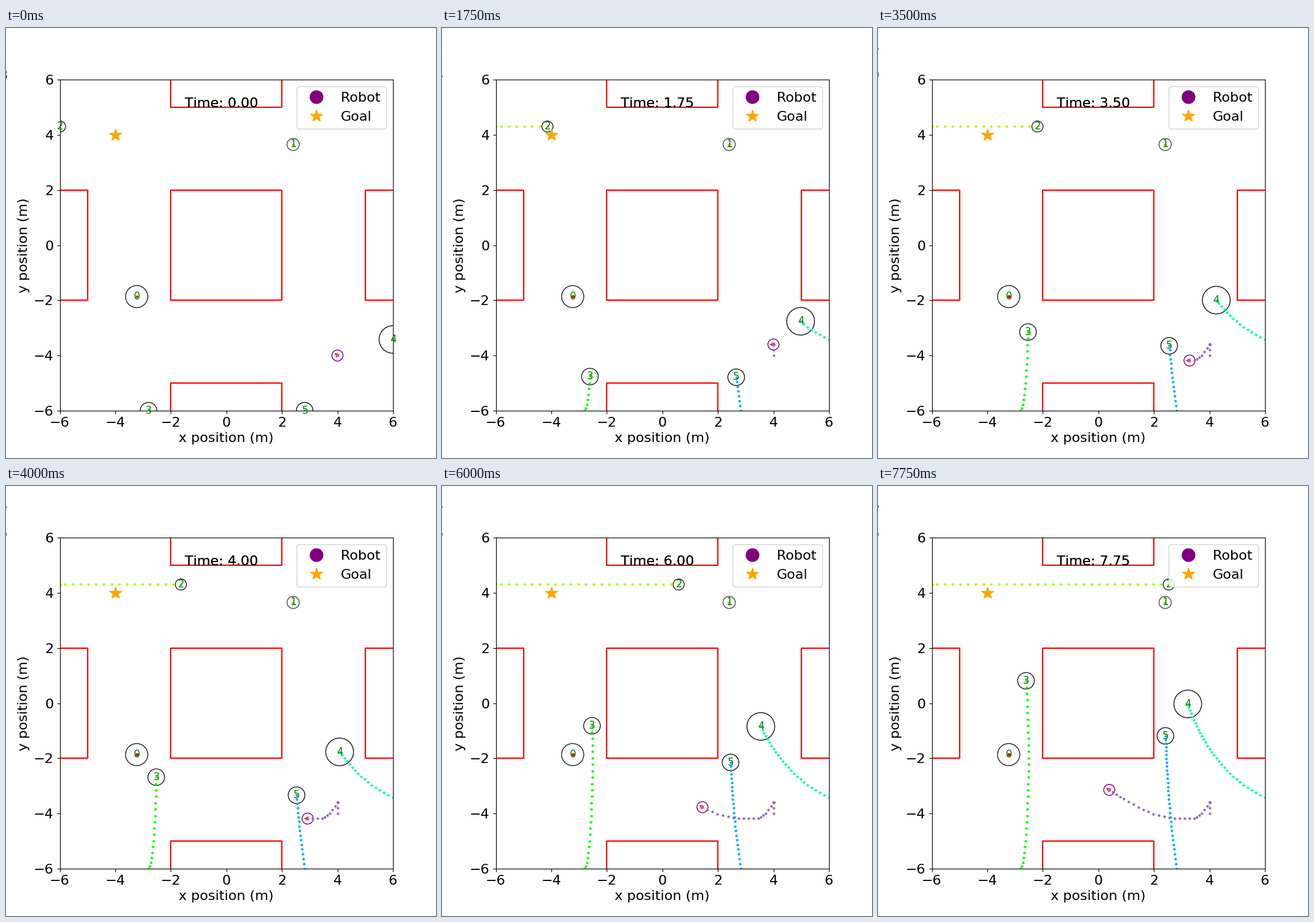
Recreate the animation shown at these times as a matplotlib script. Size 700 px wide and 700 px high, loop 8 s.

```python
import colorsys

import matplotlib.pyplot as plt
import numpy as np
from matplotlib import patches
from matplotlib.animation import FuncAnimation

STEPS, DT = 32, 0.25
FONT = 16
DOT = dict(ls="None", marker=".", ms=4)
plt.rcParams["text.kerning_factor"] = 6  # whole-pixel letter spacing

k = np.arange(STEPS)


def ease(tau):
    """Rise from 0 towards 1 with time constant tau, in steps."""
    return 1 - np.exp(-k / tau)


def path(x, y):
    return np.column_stack(np.broadcast_arrays(x, y, k)[:2])


# (path, radius, grey level of the outline)
humans = [
    (path(-3.23, -1.865), 0.4, 0.13),
    (path(2.405, 3.65), 0.22, 0.3),
    (path(np.maximum(-6.085 + 0.278 * k, -5.99), 4.3), 0.2, 0.15),
    (path(-2.587 - 0.0006 * (k - 19) ** 2 + 0.067 * ease(2),
          -6 + 0.233 * k - 0.412 * ease(2.2)), 0.3, 0.12),
    (path(6 - 3.605 * ease(21),
          -3.418 + 0.117 * k - 0.238 * ease(6.3)), 0.5, 0.08),
    (path(2.82 - 0.49 * ease(17.5),
          -6 + 0.1785 * k - 0.00075 * k**2), 0.3, 0.09),
]

# The robot steps up, waits, then swings round to the left.
ROBOT_R, WAIT_END = 0.2, 7
way_k = [0, 2, WAIT_END, 10, 13, 17, 21, 24, 27, 31]
way_x = [4, 4, 4, 3.73, 3.46, 2.75, 1.985, 1.443, 0.912, 0.393]
way_y = [-4, -3.6, -3.6, -4, -4.18, -4.185, -4.02, -3.77, -3.473, -3.144]
robot_path = path(np.interp(k, way_k, way_x), np.interp(k, way_k, way_y))

# It faces its next step, after turning to the left during the wait.
step = np.diff(robot_path, axis=0)
step = np.vstack([step, step[-1]])
heading = np.arctan2(step[:, 1], step[:, 0])
heading[:WAIT_END + 1] = np.radians(np.linspace(135, 180, WAIT_END + 1))


def held(starts, digits):
    """One digit per step, each kept until the next start."""
    return [digits[i - 1] for i in np.searchsorted(starts, k, side="right")]


# Last digits of two scores that mostly lie off the left edge
score_rows = [(6, held([0, 4, 10, 16], "3406")),
              (7, held([0, 8, 17, 21, 26], "14046"))]

fig, ax = plt.subplots(figsize=(7, 7), dpi=100)
ax.set_xlim(-6, 6)
ax.set_ylim(-6, 6)
ax.set_xticks(range(-6, 7, 2))
ax.set_yticks(range(-6, 7, 2))
ax.tick_params(labelsize=FONT)
ax.set_xlabel("x position (m)", fontsize=FONT)
ax.set_ylabel("y position (m)", fontsize=FONT)

for cx, cy in [(0, 0), (0, 7), (0, -7), (7, 0), (-7, 0)]:
    ax.plot(cx + np.array([-2, 2, 2, -2, -2]),
            cy + np.array([-2, -2, 2, 2, -2]), color="red", lw=1.5)

goal, = ax.plot([-4], [4], "*", color="orange", ms=15)
robot_key = plt.Line2D([], [], ls="None", marker="o", color="purple", ms=15)
ax.legend([robot_key, goal], ["Robot", "Goal"], fontsize=FONT,
          loc="upper right", numpoints=1)

circles, labels, trails = [], [], []
for i, (pos, r, grey) in enumerate(humans):
    circles.append(ax.add_patch(
        patches.Circle(pos[0], r, fill=False, ec=str(grey))))
    labels.append(ax.text(0, 0, str(i), color="green", fontsize=12))
    hue = colorsys.hsv_to_rgb(i / 9, 1, 1)
    trails.append(ax.plot([], [], color=hue, **DOT)[0])

robot = ax.add_patch(patches.Circle((4, -4), ROBOT_R, fill=False, ec="purple"))
robot_trail, = ax.plot([], [], color="tab:purple", **DOT)
arrow = ax.add_patch(patches.FancyArrowPatch(
    (0, 0), (1, 1), color="red",
    arrowstyle=patches.ArrowStyle("->", head_length=4, head_width=2)))

# The clock is printed twice, which makes it look heavier.
clocks = [ax.text(-1.5, 5, "", fontsize=FONT) for _ in range(2)]
scores = [ax.text(-8.205, y, "", fontsize=FONT) for y, _ in score_rows]


def update(n):
    for (pos, _, _), circle, label, trail in zip(humans, circles, labels, trails):
        circle.center = pos[n]
        label.set_position(pos[n] - 0.11)
        trail.set_data(*pos[:n + 1].T)
    here = robot_path[n]
    robot.center = here
    robot_trail.set_data(*robot_path[:n + 1].T)
    tip = here + ROBOT_R * np.array([np.cos(heading[n]), np.sin(heading[n])])
    arrow.set_positions(tuple(here), tuple(tip))
    for clock in clocks:
        clock.set_text(f"Time: {n * DT:.2f}")
    for score, (_, digits) in zip(scores, score_rows):
        score.set_text(digits[n])
    return []


anim = FuncAnimation(fig, update, frames=STEPS, interval=1000 * DT,
                     init_func=lambda: update(0), repeat=True, repeat_delay=0)
plt.show()
```
